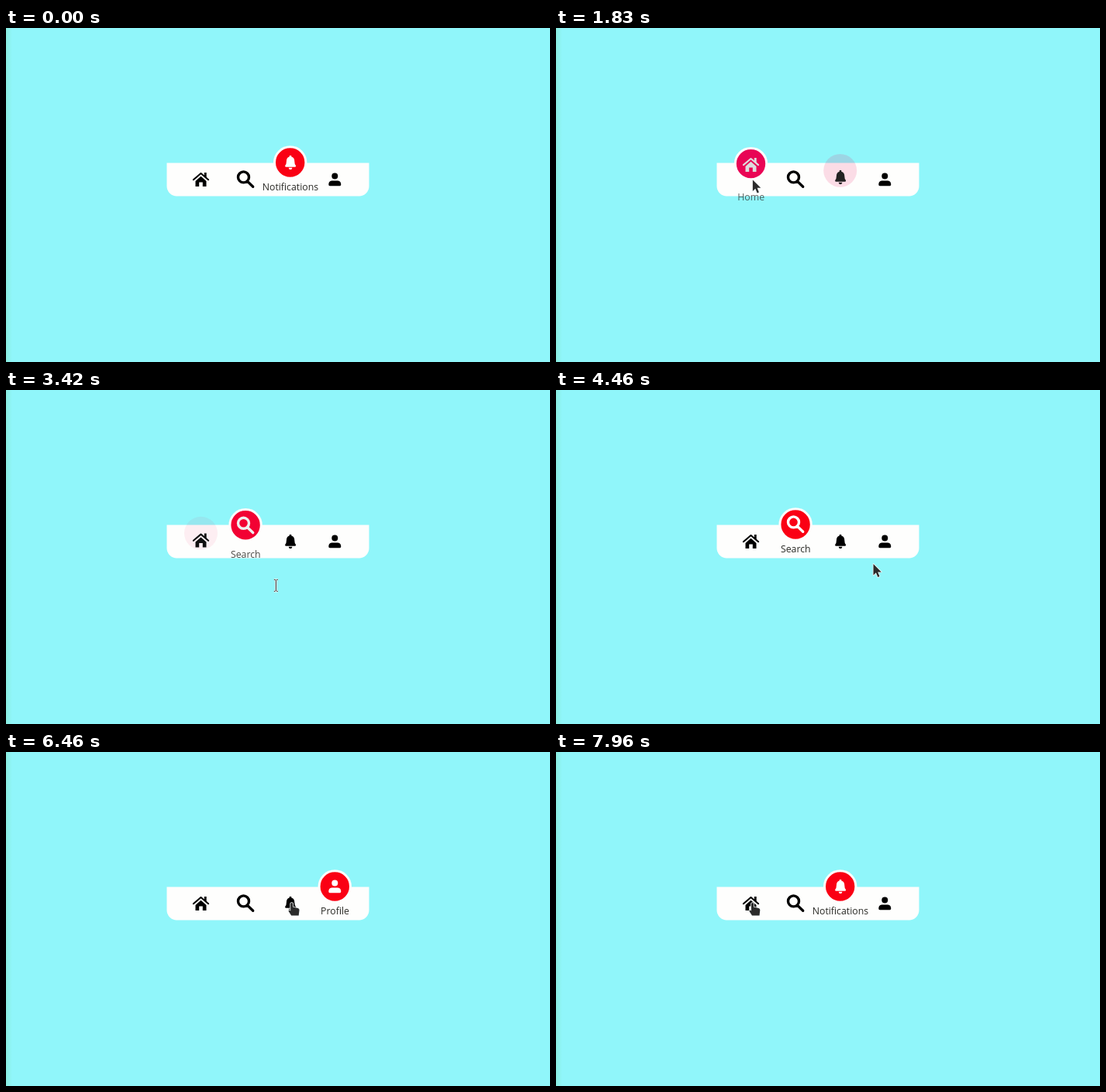
An HTML page with a canvas for the animation above (8 s loop, 702 by 432 pixels).

```html
<!DOCTYPE html>
<html lang="en">
<head>
<meta charset="utf-8">
<title>Navigation bar</title>
<style>
  html, body { margin: 0; width: 100%; height: 100%; overflow: hidden; background: #90f6fa; }
  canvas { display: block; }
</style>
</head>
<body>
<canvas id="stage" width="702" height="432"></canvas>
<script>
const ctx = document.getElementById('stage').getContext('2d');
const LOOP = 8000, DURATION = 500, LABEL_DELAY = 70;
const ICON_Y = 196, ICON_LIFT = 22, CIRCLE_Y = 186, CIRCLE_LIFT = 12;
const LABEL_Y = 252, LABEL_LIFT = 47;
const HOME = 0, SEARCH = 1, BELL = 2, PROFILE = 3;
const itemX = index => 251.5 + 57.6 * index;

// Icons are drawn around their own centre.
const items = [
  { label: 'Home', width: 2.1,
    fill: new Path2D('M-7 2L0-4.2L7 2V9H2.3V3.5H-2.3V9H-7ZM4.4-9H7.2V-2L4.4-4.4Z'),
    line: new Path2D('M-9.6.2L0-8L9.6.2') },
  { label: 'Search', width: 3.4,
    line: new Path2D('M4.4-3.1A7 7 0 1 1-9.6-3.1A7 7 0 1 1 4.4-3.1M2.8 2.6L9.6 9.2') },
  { label: 'Notifications',
    fill: new Path2D('M-1-8.8Q.4-9.6 1.6-8.8V-7.4Q5.6-6.4 5.6-1.6Q5.6 2.4 7.3 4Q7.9 5.8 6.2 5.8H-5.4Q-7.1 5.8-6.5 4Q-4.8 2.4-4.8-1.6Q-4.8-6.4-1-7.4ZM-2 6.8H2.7A2.3 2.3 0 0 1-2 6.8Z') },
  { label: 'Profile',
    fill: new Path2D('M4-4.4A4 4 0 1 1-4-4.4A4 4 0 1 1 4-4.4ZM-4 1.6H4Q8 2.2 8 6.5Q8 8.2 6.5 8.2H-6.5Q-8 8.2-8 6.5Q-8 2.2-4 1.6Z') }
];

// Where the pointer calls, and whether it clicks there.
const visits = [
  [1000, HOME], [1545, HOME, true], [1830, HOME], [3075, SEARCH, true],
  [4810, PROFILE, true], [5520, BELL, true], [5920, PROFILE, true], [6440, BELL],
  [6740, BELL, true], [7130, SEARCH], [7500, BELL], [7900, HOME]
];
const clicks = [[-LOOP, BELL], ...visits.filter(visit => visit[2])];

const clamp = v => Math.max(0, Math.min(1, v));
const smooth = v => { v = clamp(v); return v * v * (3 - 2 * v); };
const mix = (a, b, k) => a + (b - a) * k;

// The standard "ease" curve, cubic-bezier(.25, .1, .25, 1).
function ease(x) {
  if (x <= 0 || x >= 1) return clamp(x);
  const bezier = (s, a, b) => 3 * s * (1 - s) * ((1 - s) * a + s * b) + s ** 3;
  let low = 0, high = 1;
  for (let i = 0; i < 20; i++) {
    const mid = (low + high) / 2;
    if (bezier(mid, .25, .25) < x) low = mid; else high = mid;
  }
  return bezier(low, .1, 1);
}

function itemState(index, time) {
  let start = -LOOP, entering = false;
  clicks.forEach(([at, selected], i) => {
    if (at > time) return;
    if (selected === index) { start = at; entering = true; }
    else if (i && clicks[i - 1][1] === index) { start = at; entering = false; }
  });
  const progress = delay => {
    const e = ease((time - start - delay) / DURATION);
    return entering ? e : 1 - e;
  };
  return { entering, active: progress(0), text: progress(entering ? LABEL_DELAY : 0) };
}

// The pointer enters from below, then swings under the bar from icon to icon.
function pointerAt(time) {
  const spot = ([, item]) => ({ x: itemX(item) + 2, y: 195 });
  const next = visits.findIndex(visit => visit[0] > time);
  if (next < 0) return spot(visits.at(-1));
  const to = spot(visits[next]), end = visits[next][0];
  const from = next ? spot(visits[next - 1]) : { x: 470, y: 440 };
  const begin = next ? visits[next - 1][0] : 0;
  const k = ((time - begin) / (end - begin)) ** .7;
  const dip = next && from.x !== to.x ? Math.min(68, .055 * (end - begin)) : 0;
  return { x: mix(from.x, to.x, k), y: mix(from.y, to.y, k) + dip * Math.sin(Math.PI * k) };
}

function disc(x, y, r) {
  ctx.beginPath();
  ctx.arc(x, y, r, 0, 2 * Math.PI);
}

function drawBackground() {
  const edge = ctx.createLinearGradient(0, 0, 8, 0);
  edge.addColorStop(0, '#8aeee0');
  edge.addColorStop(1, '#90f6fa');
  ctx.fillStyle = edge;
  ctx.fillRect(0, 0, 702, 432);
  ctx.fillStyle = '#fefefd';
  ctx.beginPath();
  ctx.roundRect(207.5, 174.5, 261, 43, [0, 0, 13, 13]);
  ctx.fill();
}

function drawCircle(x, { active, entering }) {
  if (active <= 0) return;
  const y = CIRCLE_Y - CIRCLE_LIFT * active, rest = 1 - active;
  const ring = smooth((active - .1) / .7);
  ctx.globalAlpha = entering ? 1 - rest * rest : active;
  ctx.fillStyle = `rgb(${250 - 120 * Math.min(.15, rest)}, 0, ${20 + Math.min(62, 500 * rest)})`;
  disc(x, y, 21.5 - 2 * ring);
  ctx.fill();
  ctx.globalAlpha = ring;
  ctx.strokeStyle = '#fefefd';
  ctx.lineWidth = 3;
  disc(x, y, 20.2);
  ctx.stroke();
  ctx.globalAlpha = 1;
}

function drawIcon(x, { fill, line, width }, active) {
  const light = 255 * active;
  ctx.save();
  ctx.translate(x, ICON_Y - ICON_LIFT * active);
  ctx.fillStyle = ctx.strokeStyle = `rgb(${light}, ${light}, ${light})`;
  ctx.lineCap = ctx.lineJoin = 'round';
  if (fill) ctx.fill(fill);
  if (line) { ctx.lineWidth = width; ctx.stroke(line); }
  ctx.restore();
}

function drawLabel(x, { label }, { text, entering }) {
  ctx.globalAlpha = entering ? text : text ** 3;
  ctx.fillStyle = '#2a2a26';
  ctx.font = '12.3px "Open Sans", "Noto Sans", sans-serif';
  ctx.textAlign = 'center';
  ctx.fillText(label, x + .2, LABEL_Y - LABEL_LIFT * text + 4.7);
  ctx.globalAlpha = 1;
}

const cursors = {
  arrow: new Path2D('M0 0V14.5L3.4 11.3L5.8 17L8 16L5.7 10.4H10.3Z'),
  hand: new Path2D('M-1.5 1Q0-1 1.5 1V5.5L8 7Q10 7.5 9.8 9.5L9 16.5H-.5L-4 11Q-4 8.5-1.5 10.5Z'),
  text: new Path2D('M-2.5-7.5H-1L0-6.5L1-7.5H2.5M0-6.5V6.5M-2.5 7.5H-1L0 6.5L1 7.5H2.5')
};

function cursorKind({ x, y }, states) {
  let kind = 'arrow';
  items.forEach((item, i) => {
    const { active, text } = states[i], dx = Math.abs(x - itemX(i));
    const labelY = LABEL_Y - LABEL_LIFT * text;
    if (dx < 11 && Math.abs(y - ICON_Y + ICON_LIFT * active) < 11) kind = 'hand';
    else if (dx < item.label.length * 2.8 && Math.abs(y - labelY) < 10) kind = 'text';
  });
  return kind;
}

function drawCursor({ x, y }, kind) {
  const isText = kind === 'text';
  ctx.save();
  ctx.translate(x, y);
  ctx.lineJoin = 'round';
  ctx.strokeStyle = '#f4f8f8';
  ctx.lineWidth = isText ? 2.6 : 1.6;
  ctx.stroke(cursors[kind]);
  ctx.fillStyle = ctx.strokeStyle = '#2b2b2b';
  ctx.lineWidth = 1;
  if (isText) ctx.stroke(cursors.text); else ctx.fill(cursors[kind]);
  ctx.restore();
}

function draw(time) {
  const states = items.map((_, i) => itemState(i, time));
  drawBackground();
  items.forEach((_, i) => drawCircle(itemX(i), states[i]));
  items.forEach((item, i) => drawIcon(itemX(i), item, states[i].active));
  items.forEach((item, i) => drawLabel(itemX(i), item, states[i]));
  const pointer = pointerAt(time);
  drawCursor(pointer, cursorKind(pointer, states));
}

const begin = performance.now();
function frame() {
  draw((performance.now() - begin) % LOOP);
  requestAnimationFrame(frame);
}
frame();
</script>
</body>
</html>
```
